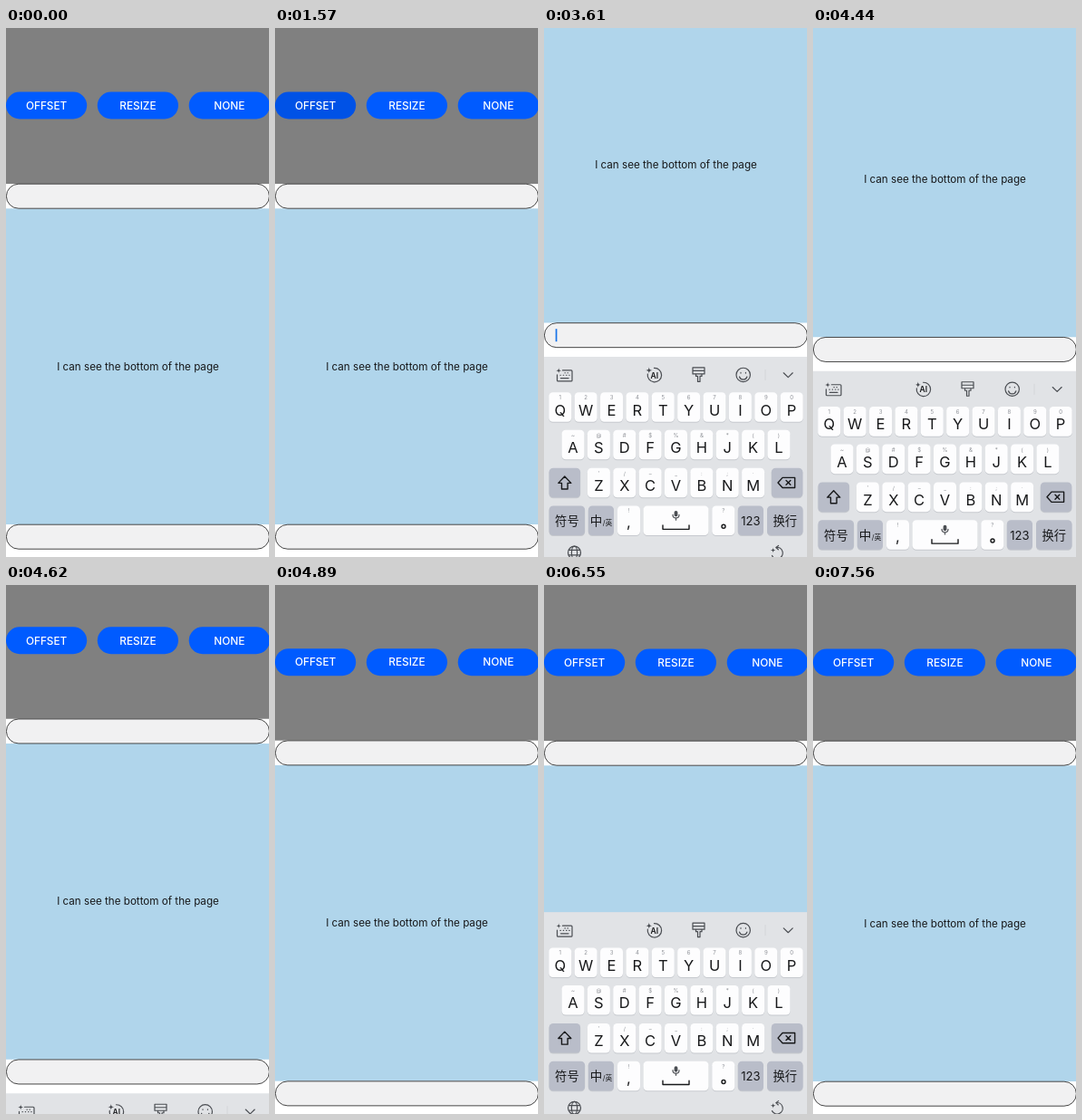
These frames come from a looping animation (290 px wide and 584 px high, 8 s). An HTML page:

```html
<!DOCTYPE html>
<html lang="en">
<head>
<meta charset="utf-8">
<title>Keyboard avoidance</title>
<style>
  html, body { margin: 0; width: 100%; height: 100%; overflow: hidden; background: #fff; }
  svg { display: block; width: 100vw; height: 100vh; }
  text { font-family: Inter, "Noto Sans CJK SC", "Noto Sans CJK", sans-serif; text-anchor: middle; fill: #17181a; }
  .button { fill: #005bff; }
  .label { font-size: 11.8px; font-weight: 500; fill: #fff; }
  .field { fill: #f1f1f2; stroke: #333; stroke-width: .9; }
  .hint { font-size: 6px; fill: #8d9096; }
  .letter { font-size: 16.5px; }
  .icon { fill: none; stroke: #4a4d52; stroke-width: 1.2; stroke-linecap: round; stroke-linejoin: round; }
  .dark { stroke: #17181a; stroke-width: 1.4; }
  .spark { fill: #4a4d52; }
</style>
</head>
<body>
<svg viewBox="0 0 290 584" preserveAspectRatio="none">
  <rect width="290" height="584" fill="#fff"/>
  <g id="page"></g>
  <g id="keyboard"></g>
  <circle id="touch" r="8" fill="#f7f7f5" stroke="#cfcfcf"/>
</svg>
<script>
const LOOP = 8000, STEP = 90, TRAVEL = 224.5;
const NS = 'http://www.w3.org/2000/svg';
const page = document.getElementById('page');
const keyboard = document.getElementById('keyboard');
const touch = document.getElementById('touch');

function add(parent, tag, attrs, content) {
  const node = document.createElementNS(NS, tag);
  for (const name in attrs) node.setAttribute(name, attrs[name]);
  if (content !== undefined) node.textContent = content;
  return parent.appendChild(node);
}
const rect = (parent, x, y, width, height, attrs) =>
  add(parent, 'rect', { x, y, width, height, ...attrs });
const text = (parent, x, y, content, attrs) => add(parent, 'text', { x, y, ...attrs }, content);
const icon = (d, extra = '') => add(keyboard, 'path', { d, class: 'icon ' + extra });
const spark = (x, y, r) => add(keyboard, 'path', {
  class: 'spark',
  d: `M${x} ${y - r}Q${x} ${y} ${x + r} ${y}Q${x} ${y} ${x} ${y + r}Q${x} ${y} ${x - r} ${y}Q${x} ${y} ${x} ${y - r}`
});

// Page
rect(page, 0, 0, 290, 172, { fill: '#808080' });
rect(page, 0, 199.3, 290, 348.7, { fill: '#b0d5eb' });
const [offsetButton] = [[0, 'OFFSET'], [100.8, 'RESIZE'], [201.7, 'NONE']].map(([x, name]) => {
  const button = rect(page, x, 70.5, 89.2, 30, { rx: 15, class: 'button' });
  text(page, x + 44.6, 89.8, name, { class: 'label' });
  return button;
});
text(page, 145.5, 377.5, 'I can see the bottom of the page', { 'font-size': 11.65, fill: '#222' });
const [topCaret, bottomCaret] = [172.2, 548.2].map(y => {
  rect(page, .4, y, 290, 27, { rx: 13.5, class: 'field' });
  return rect(page, 12.7, y + 6.5, 1.7, 14, { fill: '#1672e8' });
});

// Keyboard
rect(keyboard, 0, 361, 290, 226, { fill: '#e1e3e6' });

function key(x, y, width, fill = '#fdfdfe') {
  rect(keyboard, x, y + 1, width, 32.6, { rx: 4.5, fill: '#c6c9ce' });
  rect(keyboard, x, y, width, 32.6, { rx: 4.5, fill });
}
const GREY = '#b9bdc9';

function letterRow(letters, hints, firstX, y) {
  [...letters].forEach((letter, i) => {
    const x = firstX + 28.37 * i;
    key(x - 12.5, y, 25);
    text(keyboard, x, y + 8, hints[i], { class: 'hint' });
    text(keyboard, x, y + 25.3, letter, { class: 'letter' });
  });
}
letterRow('QWERTYUIOP', '1234567890', 17.8, 400.3);
letterRow('ASDFGHJKL', '~@#$%&*()', 32, 441.8);
letterRow('ZXCVBNM', "'/–_:;·", 60.4, 483.8);

key(5.6, 483.8, 34.5, GREY);
key(250.8, 483.8, 34.5, GREY);
icon('M22.8 493l7 7.4h-3.7v6.6h-6.6v-6.6h-3.7z', 'dark');
icon('M258 500l5-5.6h13.6v11.2H263zM267 497.6l4.8 4.8M271.8 497.6l-4.8 4.8', 'dark');

const bottomY = 525.5, baseline = bottomY + 21.3;
[[5.6, 39.5], [48.8, 28.2], [213.8, 28.2], [246, 39.5]].forEach(([x, w]) => key(x, bottomY, w, GREY));
[[81, 25], [109.5, 72], [185.3, 25]].forEach(([x, w]) => key(x, bottomY, w));
text(keyboard, 25.4, baseline, '符号', { 'font-size': 13.3 });
text(keyboard, 57.5, baseline, '中', { 'font-size': 13.5, 'font-weight': 500 });
text(keyboard, 70, baseline, '/英', { 'font-size': 7.8, fill: '#6d7078' });
text(keyboard, 227.9, baseline, '123', { 'font-size': 13 });
text(keyboard, 265.8, baseline, '换行', { 'font-size': 13.3 });
text(keyboard, 93.5, bottomY + 8, '!', { class: 'hint' });
text(keyboard, 93.5, bottomY + 24, ',', { class: 'letter' });
text(keyboard, 197.8, bottomY + 8, '?', { class: 'hint' });
add(keyboard, 'circle', { cx: 198, cy: 548.3, r: 2, class: 'icon dark' });
icon('M131 547v4.4h29V547', 'dark');
rect(keyboard, 143.6, 531, 3.8, 6.4, { rx: 1.9, fill: '#4a4d52' });
icon('M142 535.5a3.5 3.5 0 0 0 7 0M145.5 539v2.2');

// Toolbar
icon('M20.5 376H30a1 1 0 0 1 1 1v10a1 1 0 0 1-1 1H15.500a1 1 0 0 1-1-1v-6M18.500 384.700h8.500M18 381.300h.4M21.300 381.300h.4M24.600 381.300h.4M27.700 381.300h.4M23 378.800h.4M26 378.800h.4');
spark(16.2, 376.2, 3.2);
icon('M121.500 373.500a7.700 7.700 0 1 1-7.200 6.500');
spark(115.8, 376, 3.6);
text(keyboard, 121.8, 384.6, 'AI', { 'font-size': 8.5, 'font-weight': 600, fill: '#4a4d52' });
icon('M164 373h13v7h-13zM164 376.500h13M167.500 380v2.500h2v6h2.500v-6h2V380');
add(keyboard, 'circle', { cx: 219.7, cy: 381, r: 7.7, class: 'icon' });
icon('M215.500 383a4.400 4.400 0 0 0 8.400 0M217 378.500v.6M222.400 378.500v.6');
icon('M264.200 378.800l5 4.800 5-4.800');
rect(keyboard, 243.6, 375, .8, 12, { fill: '#cfd1d5' });

// Bottom strip
add(keyboard, 'circle', { cx: 33.5, cy: 577.2, r: 7, class: 'icon' });
add(keyboard, 'ellipse', { cx: 33.5, cy: 577.2, rx: 3.1, ry: 7, class: 'icon' });
icon('M27.500 574.500h12M27.500 580h12');
icon('M256 571.500a6.200 6.200 0 1 1-4.500 9M258.500 569.500l-2.700 2 2.500 2.300');
spark(252.6, 574.5, 3);

// Motion
const shows = [
  { rise: 3243, riseFrame: 3250, fall: 4415, fallFrame: 4440, end: 5090, shift: TRAVEL },
  { rise: 6020, riseFrame: 6010, fall: 7155, fallFrame: 7200, end: 7560, shift: 0 }
];
const touches = [[1390, 1570, 46, 88], [3140, 3250, 183, 561], [5920, 6010, 183, 187]];

const within = (t, from, to) => t >= from && t < to;
const held = (t, first) => first + Math.floor((t - first) / STEP) * STEP;

// Critically damped spring
function spring(ms) {
  const x = 18.5 * Math.max(0, ms) / 1000;
  return 1 - (1 + x) * Math.exp(-x);
}
function openness(t, s) {
  if (!within(t, s.riseFrame, s.end)) return 0;
  return t < s.fallFrame
    ? spring(held(t, s.riseFrame) - s.rise)
    : 1 - spring(held(t, s.fallFrame) - s.fall);
}
const show = (node, visible) => node.setAttribute('visibility', visible ? 'visible' : 'hidden');

function render(t) {
  let open = 0, shift = 0;
  for (const s of shows) {
    const amount = openness(t, s);
    open += amount;
    shift += amount * s.shift;
  }
  page.setAttribute('transform', `translate(0 ${-shift})`);
  keyboard.setAttribute('transform', `translate(0 ${(1 - open) * TRAVEL})`);
  show(keyboard, open > 0);

  show(bottomCaret, within(t, 3250, 3880) || within(t, 4260, 4440));
  show(topCaret, within(t, 6010, 6550) || within(t, 6930, 7200));

  offsetButton.style.fill = within(t, 1390, 1660) ? '#0052e6' : '';
  const tap = touches.find(([from, to]) => within(t, from, to));
  show(touch, tap);
  if (tap) touch.setAttribute('transform', `translate(${tap[2]} ${tap[3]})`);
}

const start = performance.now();
function frame() {
  render((performance.now() - start) % LOOP);
  requestAnimationFrame(frame);
}
frame();
</script>
</body>
</html>
```
